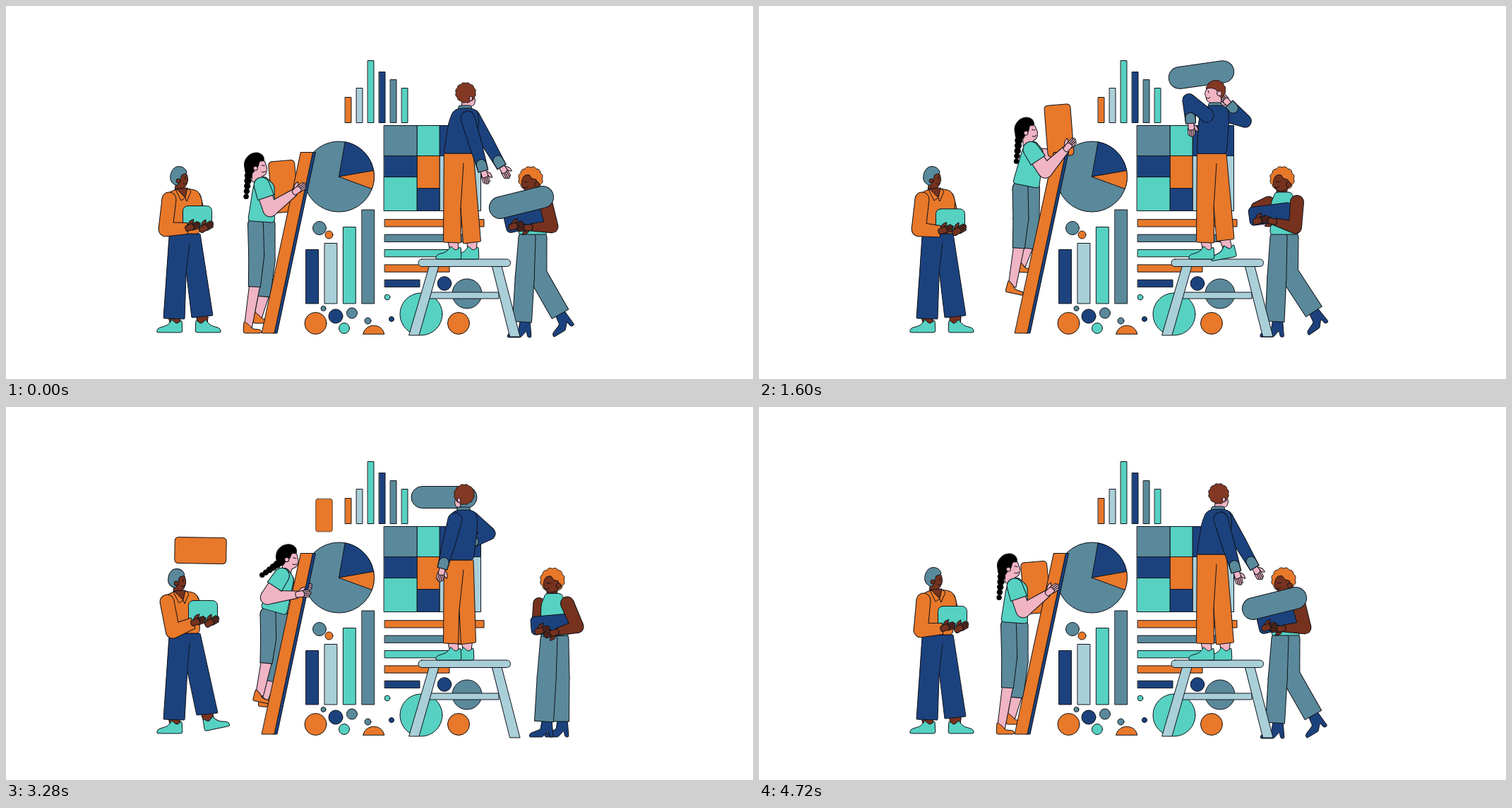
An HTML page with a canvas for the animation above (4800 ms loop, 1058 by 529 pixels).

```html
<!DOCTYPE html>
<html lang="en">
<head>
<meta charset="utf-8">
<title>Building the charts</title>
<style>
html, body { margin: 0; height: 100%; overflow: hidden; background: #fff; }
canvas { display: block; width: 100vw; height: 100vh; }
</style>
</head>
<body>
<canvas id="stage" width="1058" height="529"></canvas>
<script>
const g = document.getElementById('stage').getContext('2d');
const LOOP = 4800, STEP = 80;
const ORANGE = '#e8782a', TEAL = '#56d1c2', NAVY = '#1c427e', SLATE = '#5a899b', PALE = '#a9cfd9',
  PINK = '#f0b4c4', BROWN = '#76321e', HAIR = '#823822', INK = '#10131a';
let t = 0;

// --- motion ---
// Eased value of a looping track of [time, ...values] keys
function at(...keys) {
  const i = keys.findLastIndex(k => k[0] <= t);
  const a = keys.at(i), b = keys[(i + 1) % keys.length];
  let k = ((t - a[0] + LOOP) % LOOP) / ((b[0] - a[0] + LOOP) % LOOP || LOOP);
  k = k * k * (3 - 2 * k);
  return a.slice(1).map((v, j) => v + (b[j + 1] - v) * k);
}

const pairs = v => v.flatMap((x, i) => i % 2 ? [] : [[x, v[i + 1]]]);
const mid = (a, b, k) => [a[0] + (b[0] - a[0]) * k, a[1] + (b[1] - a[1]) * k];
const shift = (p, x, y) => [p[0] + x, p[1] + y];
const angle = (a, b) => Math.atan2(b[1] - a[1], b[0] - a[0]) * 180 / Math.PI;

function turned(p, deg, x, y) {
  const a = deg * Math.PI / 180, c = Math.cos(a), s = Math.sin(a);
  return shift(p, x * c - y * s, x * s + y * c);
}

// Elbow between two ends, bones m and n long, bending towards (x, y)
function elbow(a, b, m, n, x, y) {
  const d = Math.hypot(b[0] - a[0], b[1] - a[1]) || 1;
  if (d >= m + n) return mid(a, b, m / (m + n));
  const ux = (b[0] - a[0]) / d, uy = (b[1] - a[1]) / d;
  const k = (m * m - n * n + d * d) / (2 * d);
  const h = Math.sqrt(Math.max(0, m * m - k * k)) * (ux * y - uy * x < 0 ? -1 : 1);
  return [a[0] + ux * k - uy * h, a[1] + uy * k + ux * h];
}

// --- drawing ---
function paint(fill) {
  g.fillStyle = fill;
  g.fill();
  g.stroke();
}

function poly(fill, v, r = 3) {
  const p = pairs(v), n = p.length;
  g.beginPath();
  p.forEach((c, i) => {
    const cut = q => mid(c, q, Math.min(.5, r / (Math.hypot(q[0] - c[0], q[1] - c[1]) || 1)));
    g.lineTo(...cut(p[(i + n - 1) % n]));
    g.quadraticCurveTo(...c, ...cut(p[(i + 1) % n]));
  });
  g.closePath();
  paint(fill);
}

function box(fill, x, y, w, h, r = 0) {
  g.beginPath();
  g.roundRect(x, y, w, h, r);
  paint(fill);
}

function disc(fill, x, y, r, from = 0, to = 7) {
  g.beginPath();
  g.arc(x, y, r, from, to);
  g.closePath();
  paint(fill);
}

function line(...v) {
  g.beginPath();
  pairs(v).forEach(p => g.lineTo(...p));
  g.stroke();
}

function smile(x, y, r) {
  g.beginPath();
  g.arc(x, y, r, .6, 2.2);
  g.stroke();
}

function part([x, y], deg, draw, flip = 1, scale = 1) {
  g.save();
  g.translate(x, y);
  g.rotate(deg * Math.PI / 180);
  g.scale(scale * flip, scale);
  draw();
  g.restore();
}

// Tapered limb with one outline around all its segments
function limb(fill, w, ...p) {
  for (const [color, e] of [[INK, .5], [fill, -.5]]) {
    g.fillStyle = color;
    p.slice(1).forEach((q, i) => {
      const o = p[i], l = Math.hypot(q[0] - o[0], q[1] - o[1]) + e;
      const u = w[i] + e, v = w[i + 1] + e;
      part(o, angle(o, q), () => {
        g.beginPath();
        g.arc(0, 0, u, 0, 7);
        g.fill();
        g.beginPath();
        pairs([0, -u, l, -v, l, v, 0, u]).forEach(c => g.lineTo(...c));
        g.fill();
      });
    });
  }
}

function hand(p, deg, skin) {
  part(p, deg, () => {
    poly(skin, [0, -3, 6, -9, 13, -10, 8, -3], 2);
    for (let i = 0; i < 4; i++) box(skin, 6, -5 + i * 2.4, 14 - Math.abs(i - 1.3) * 2, 2.6, 1.3);
    poly(skin, [-3, -4, 9, -5, 10, 4, -3, 4]);
  });
}

function curls(r, bump, fill) {
  g.beginPath();
  for (let i = 0; i < 120; i++) {
    const a = i * Math.PI / 60, d = r + bump * Math.abs(Math.sin(a * 6));
    g.lineTo(d * Math.cos(a), d * Math.sin(a));
  }
  g.closePath();
  paint(fill);
}

// Wide trousers: hems w to each side, legs parting at the crotch
function trousers(fill, waist, half, left, right, w, split) {
  const [x, y] = waist, crotch = mid(waist, mid(left, right, .5), split);
  poly(fill, [x - half, y, x + half, y, right[0] + w, right[1] - 2, right[0] - w, right[1] + 1,
    ...crotch, left[0] + w, left[1] + 1, left[0] - w, left[1]], 1);
  line(...crotch, x + 7, y + 14);
}

const shoe = (p, deg, flip) => part(p, deg, () =>
  poly(TEAL, [-9, -2, -10, 16, 27, 16, 25, 10, 12, 6, 6, 0, 6, -3, -2, 4]), flip);
const flat = (p, deg) => part(p, deg, () =>
  poly(ORANGE, [-6, -3, -7, 14, 19, 14, 18, 9, 6, 8, 1, 2]));
const boot = (p, deg) => part(p, deg, () =>
  poly(NAVY, [-7, -9, 7, -9, 9, 16, 4, 16, 2, 7, -6, 16, -25, 16, -24, 11, -9, 5], 2));

function item(fill, w, h, r, [x, y, deg = 0, scale = 1]) {
  if (scale > .01) part([x, y], deg, () => box(fill, -w / 2, -h / 2, w, h, r), 1, scale);
}

// --- charts ---
function charts() {
  [[ORANGE, 129], [PALE, 116], [TEAL, 77], [NAVY, 93], [SLATE, 104], [TEAL, 116]]
    .forEach(([c, y], i) => box(c, 480.5 + 16 * i, y + .5, 8.5, 165 - y));
  disc(SLATE, 471.5, 242, 50);
  for (const [c, a, b] of [[NAVY, -80, -10], [ORANGE, -10, 20]]) {
    g.beginPath();
    g.moveTo(471.5, 242);
    g.arc(471.5, 242, 50, a * Math.PI / 180, b * Math.PI / 180);
    g.closePath();
    paint(c);
  }
  // Treemap: columns of [x, width, ...[colour, height]]
  [[535.5, 47, [SLATE, 43], [NAVY, 30], [TEAL, 48]], [582.5, 32, [TEAL, 43], [ORANGE, 46], [NAVY, 32]],
    [614.5, 58, [NAVY, 43], [PALE, 78]]].forEach(([x, w, ...cells]) => {
    let y = 169.5;
    for (const [c, h] of cells) {
      box(c, x, y, w, h);
      y += h;
    }
  });
  [[ORANGE, 141], [SLATE, 125], [TEAL, 108], [ORANGE, 92], [NAVY, 50]]
    .forEach(([c, w], i) => box(c, 536.5, 302.7 + 21.4 * i, w - .5, 10.3));
  [[NAVY, 345.5], [PALE, 336.5], [TEAL, 313.5], [SLATE, 289]]
    .forEach(([c, y], i) => box(c, 425 + 26.4 * i, y, 17.5, 422 - y));
  [[SLATE, 444, 315, 9.5], [ORANGE, 457.5, 324.5, 5.5], [SLATE, 449.5, 429, 3.5], [ORANGE, 438.5, 450, 15.5],
    [NAVY, 467, 440, 10], [SLATE, 490, 435.5, 7.5], [TEAL, 479, 457, 7.5], [SLATE, 512.5, 446.5, 4.5],
    [NAVY, 546, 444, 3.5], [TEAL, 540, 413, 3.8], [TEAL, 588, 437, 30], [NAVY, 621, 393.5, 9.8],
    [SLATE, 653, 408, 21], [ORANGE, 641, 450, 15.5]].forEach(c => disc(...c));
  disc(ORANGE, 520.7, 468.5, 15.5, Math.PI + .23, -.23);
}

function stool() {
  box(PALE, 600, 406, 98, 9);
  poly(PALE, [599, 369, 613, 369, 585, 467, 571, 467], 0);
  poly(PALE, [688, 369, 702, 369, 728, 469, 714, 469], 0);
  box(PALE, 584, 359, 130.5, 10.5, 5);
}

function ladder() {
  poly(NAVY, [433, 207.5, 438.5, 207.5, 384, 464, 378, 464], 0);
  poly(ORANGE, [417, 207.5, 434.5, 207.5, 380, 464, 362.5, 464], 0);
}

// --- moving items: [time, x, y, angle, scale] ---
function blocks() {
  if (t < 3600) item(ORANGE, 37, 73, 5, at([0, 393, 256, -5, 1], [1200, 402, 213, -5, 1], [2000, 448, 140, -4, 1],
    [2560, 450.5, 135.5, 0, 1], [2880, 450.5, 135.5, 0, 1], [3280, 450.5, 153.5, 0, .64], [3600, 450.5, 165, 0, 0]));
  if (t > 2900) item(ORANGE, 73, 37, 5, at([2900, 275.5, 175, 1, 0], [3280, 275.5, 203.5, 1, 1],
    [3920, 275.5, 268.5, 1, 1], [4480, 375, 262, 78, 1], [4720, 392, 256, 85, 1]));
}

function pill() {
  item(SLATE, 93, 31, 15.5, at([0, 730, 278.5, -14, 1], [600, 690, 215, -20, 1], [1200, 629, 115, -17, 1],
    [1440, 628, 90, -10, 1], [2000, 620.5, 128, 0, 1], [3400, 620.5, 128, 0, 1], [3920, 620.5, 153.5, 0, 1],
    [4150, 620.5, 190, 0, 1], [4160, 735, 200, -14, 0], [4640, 730, 278.5, -14, 1]));
}

// --- man on the left ---
function carrier() {
  const neck = shift([250, 260], ...at([0, 0, 0], [2560, 0, 0], [3280, -3, 2], [3920, -4, 4], [4720, 2, 0]));
  const crate = at([0, 271, 299.5], [1200, 271, 299.5], [2000, 271, 308], [2560, 270.5, 297],
    [3280, 279, 290.5], [3920, 271.5, 302], [4720, 274, 298.5]);
  const [step] = at([0, 0], [2560, 0], [3280, 1], [3920, 0]);
  const waist = [253, 323 - 2 * step], hem = [278 + 7 * step, 441 - 5 * step];
  const ankle = shift(hem, 3 * step, 6), heel = [240, 447];
  limb(BROWN, [8, 7], hem, shift(ankle, 0, 5));
  limb(BROWN, [8, 7], [238, 440], shift(heel, 0, 5));
  shoe(ankle, -12 * step, 1);
  shoe(heel, 0, -1);
  trousers(NAVY, waist, 22, [238, 443], hem, 15, .45);
  limb(ORANGE, [9, 8, 7], shift(neck, 17, 12), shift(neck, 22, 28), shift(crate, 6, 6));
  part(shift(neck, -5, -17), -2 * step, () => {
    poly(BROWN, [0, -6, 11, -6, 13, 4, 10, 12, 7, 15, 9, 30, -7, 26, -4, 5]);
    poly(SLATE, [-13, 3, -11, -9, -4, -16, 6, -15, 11, -9, 11, -5, 3, -4, 3, 2, 0, 4, -1, 12, -8, 10], 5);
    disc(BROWN, -1, 5, 3);
    line(9, -1, 9, 3);
    smile(8, 6, 3.5);
  });
  part(neck, 0, () => {
    const base = waist[1] - neck[1], x = waist[0] - neck[0];
    poly(ORANGE, [-10, 0, 8, -1, 22, 2, 28, 16, x + 21, base, x - 21, base, -24, 30, -22, 6], 5);
    poly(BROWN, [-9, -1, 7, -2, 4, 12], 1);
    line(-10, 0, -2, 16, 4, 12, 6, 17, 12, 3, 7, -2);
  });
  item(TEAL, 41, 32, 7, crate);
  const sh = shift(neck, -19, 14), wr = shift(crate, -14, 16);
  limb(ORANGE, [10, 10, 8], sh, elbow(sh, wr, 43, 31, -1, 1), wr);
  hand(wr, -18, BROWN);
  hand(shift(crate, 6, 18), -30, BROWN);
}

// --- woman on the ladder ---
function climberHead(back) {
  if (back) {
    poly(PINK, [2, 0, 12, 2, 15, 10, 13, 19, 12, 28, -4, 26], 4);
    poly('#000', [-13, 5, -13, -8, -2, -16, 9, -14, 14, -5, 13, 4, 7, 8, 5, 16, -8, 17], 8);
    disc(PINK, 9, 7, 3);
    return;
  }
  poly(PINK, [0, -6, 13, -6, 17, 7, 14, 15, 8, 17, 8, 26, -6, 24, -4, 5]);
  poly('#000', [-15, 8, -16, -5, -8, -15, 3, -18, 12, -13, 13, -4, 6, -6, 4, 4, -1, 5, -3, 12, -10, 13], 6);
  disc(PINK, 0, 5, 3);
  line(9, 1, 13, 2);
  smile(11, 7, 4);
}

// Cropped leg: cloth down to a share of the way, then calf and shoe
function climberLeg(hip, ankle, cloth, w, tilt) {
  const hem = shift(mid(hip, ankle, cloth), 5, 0), knee = shift(mid(hip, hem, .5), 2, 0);
  limb(PINK, [7.5, 5.5], hem, shift(ankle, 0, 5));
  flat(ankle, tilt);
  limb(SLATE, w, hip, knee, hem);
}

function climber() {
  const [x, y, lean, nod] = at([0, 361.5, 306, 4, 0], [1200, 376, 264, 4, 0], [2000, 380, 246, 18, 0],
    [2560, 378, 257, 14, 0], [3280, 379, 290, 16, 14], [3920, 361.5, 315, 4, 0], [4720, 361.5, 306, 4, 0]);
  const [ax, ay, bx, by] = at([0, 343, 450, 357, 436], [1200, 364, 398, 372, 366], [2000, 353, 388, 372, 361],
    [2560, 356, 400, 374, 362], [3280, 359, 404, 365, 411], [3920, 343, 450, 357, 436]);
  const wr = at([0, 409, 264], [1200, 415, 237], [2000, 455, 169], [2560, 437, 178], [3280, 413, 266],
    [3920, 406, 275], [4720, 409, 264]);
  const far = at([0, 385, 268], [1200, 415, 205], [2000, 435, 172], [2560, 430, 174], [3280, 416, 260], [3920, 347, 300]);
  const waist = [x, y], back = t > 3560 && t < 4400;
  const head = shift(turned(waist, lean, 0, -66), nod - 13, -15);
  const sh = turned(waist, lean, -3, -52), el = elbow(sh, wr, 37, 43, -.5, 1);
  const farSh = turned(waist, lean, back ? -14 : 8, -48), farEl = elbow(farSh, far, 24, 24, -.5, 1);

  limb(PINK, [8, 8, 5], farSh, farEl, far);
  hand(far, angle(farEl, far), PINK);
  blocks();

  const tilt = Math.min(1, (450 - ay) / 45) * 12;
  climberLeg([x + 7.5, y + 4], [bx, by], .81, [12, 12.5, 10], tilt / 3);
  climberLeg([x - 8, y + 4], [ax, ay], .63, [11, 11, 8.5], tilt);
  part(head, nod - lean / 2, () => climberHead(back));
  part(waist, lean, () => poly(TEAL, [-12, -59, 1, -65, 15, -53, 19, 0, -19, 0, -15, -46], 5));
  const top = shift(head, back ? 0 : -9, 8), tip = shift(head, back ? 0 : -13 - 1.6 * nod, 45 - 1.3 * nod);
  g.fillStyle = '#000';
  for (let i = 0; i < 6; i++) {
    g.beginPath();
    g.arc(...mid(top, tip, i / 5), 6 - i * .45, 0, 7);
    g.fill();
  }

  ladder();
  limb(PINK, [10, 10, 5], sh, el, wr);
  limb(TEAL, [11, 12], sh, mid(sh, el, .5));
  hand(wr, angle(el, wr), PINK);
}

// --- man on the stool ---
function placerHead() {
  if (t >= 640 && t < 2920) {
    curls(13, 1, HAIR);
    poly(PINK, [-13, -2, -16, 6, -14, 9, -13, 16, -7, 18, -7, 25, 7, 25, 8, 11, 3, 6, 2, 0, -6, -3]);
    disc(PINK, 5, 5, 3.5);
    line(-11, 1, -10, 4);
    smile(-11, 8, 4);
    return;
  }
  const side = t >= 2920 && t < 3560 ? -1 : 1;
  poly(PINK, [-5, 5, 10 * side, 2, 14 * side, 10, 12 * side, 18, 7, 19, 7, 25, -6, 25]);
  curls(13.5, 1, HAIR);
  poly(PINK, [5 * side, 5, 10 * side, 5, 9 * side, 12, 5 * side, 11]);
}

function placerArm(sh, wr, side) {
  const el = elbow(sh, wr, 33, 33, side, .5);
  hand(wr, angle(el, wr), PINK);
  limb(NAVY, [10, 9, 7], sh, el, wr);
  limb(SLATE, [7, 7], mid(el, wr, .75), wr);
}

function placer() {
  const [x, y, w, turn] = at([0, 650, 145, 209, 16], [1200, 643, 135, 202, 0], [2000, 649, 147, 217, 0],
    [2560, 648, 147, 218, 6], [3280, 648, 146, 217, 0], [3920, 645, 146, 214, 0], [4720, 650, 145, 209, 16]);
  const [lx, ly, rx, ry] = at([0, 676, 234, 702, 228], [1200, 614, 138, 677, 115], [2000, 609, 224, 655, 192],
    [2560, 641, 231, 655, 198], [3280, 618, 229, 655, 195], [3920, 620, 229, 676, 228], [4720, 676, 234, 702, 228]);
  const [hx, lift] = at([0, 660, 0], [1200, 668, 7], [2000, 653, 0], [3280, 653, 0], [3920, 658, 0], [4720, 660, 0]);
  const [raise] = at([1200, 0], [1440, -25], [1800, 0]);
  const neck = [x, y], hem = [hx, 336 - lift], ankle = shift(hem, lift, 7 + lift / 2);
  limb(PINK, [7, 6], hem, shift(ankle, 0, 4));
  shoe(ankle, -3 * lift, -1);
  limb(PINK, [7, 6], [633, 333], [635, 347]);
  shoe([635, 343], 0, -1);
  trousers(ORANGE, [641, w], 21, [632, 335], hem, 12.5, .6);
  placerArm(shift(neck, 11, 12), [rx, ry + raise], 1);
  part(shift(neck, 1, -22), 0, placerHead);
  part(neck, 0, () => poly(SLATE, [-9, -4, 9, -4, 10, 4, -10, 4]));
  poly(NAVY, [x - 8, y, x + 10, y, x + 18, y + 4, x + 20, y + 20, 662, w, 620, w, x - 23, y + 20, x - 17, y + 4], 5);
  placerArm(shift(neck, turn - 12, 14), [lx, ly + raise], -1);
}

// --- woman on the right ---
function helperLeg(hip, hem) {
  const trail = Math.max(0, hem[0] - hip[0] - 4), knee = shift(mid(hip, hem, .47), -.6 * trail, 0);
  boot(shift(hem, 4, 6), -1.15 * trail);
  limb(SLATE, [12, 13.5, 13.5], hip, knee, hem);
}

function helper() {
  const neck = at([0, 744, 264], [1200, 742, 264], [2000, 742, 264], [2560, 776, 265], [3920, 774, 264], [4720, 744, 264]);
  const crate = at([0, 737, 303, -13], [1200, 711, 288, -2], [2000, 738, 302, -13], [2560, 770, 301, -5],
    [3280, 774, 308, -5], [3920, 774, 304, -3], [4720, 737, 303, -13]);
  const [ax, ay, bx, by] = at([0, 731, 448, 785, 437], [1200, 730, 447, 787, 430], [2000, 731, 448, 785, 437],
    [2560, 735, 444, 782, 446], [3280, 762, 446, 784, 446], [3920, 762, 446, 784, 446], [4720, 731, 448, 785, 437]);
  const waist = shift(neck, 2, 60);
  helperLeg(shift(waist, 8, 5), [bx, by]);
  helperLeg(shift(waist, -8, 5), [ax, ay]);
  part(shift(neck, -1, -19), 0, () => {
    poly(BROWN, [-8, 8, 8, 8, 6, 24, -8, 24]);
    curls(16, 1.5, ORANGE);
    poly(BROWN, [-9, -5, -12, 1, -13, 8, -8, 17, 0, 18, 9, 13, 9, 1, 1, 0, -1, -6]);
    disc(BROWN, 9, 8, 3.5);
    line(-9, 4, -6, 5, -3, 4);
    smile(-8, 8, 5);
  });
  const sl = shift(neck, -20, 14), wl = shift(crate, -22, 11);
  const sr = shift(neck, 20, 14), wr = shift(crate, 6, 11), er = elbow(sr, wr, 36, 30, 1, 1);
  limb(BROWN, [8, 8, 5], sl, elbow(sl, wl, 19, 20, -1, .5), wl);
  part(neck, 0, () => poly(TEAL, [-11, 0, 12, 0, 18, 16, 22, 60, -18, 60, -17, 16], 4));
  item(NAVY, 61, 26, 6, crate);
  hand(wl, -15, BROWN);
  limb(BROWN, [9.5, 9, 5], sr, er, wr);
  hand(wr, angle(er, wr), BROWN);
}

// --- scene ---
function draw(now) {
  t = Math.floor(now % LOOP / STEP) * STEP;
  g.fillStyle = '#fff';
  g.fillRect(0, 0, 1058, 529);
  g.strokeStyle = INK;
  g.lineJoin = g.lineCap = 'round';
  const placed = t >= 1200 && t < 4160;
  if (placed) pill();
  charts();
  carrier();
  climber();
  helper();
  if (!placed) pill();
  stool();
  placer();
  requestAnimationFrame(draw);
}
requestAnimationFrame(draw);
</script>
</body>
</html>
```
